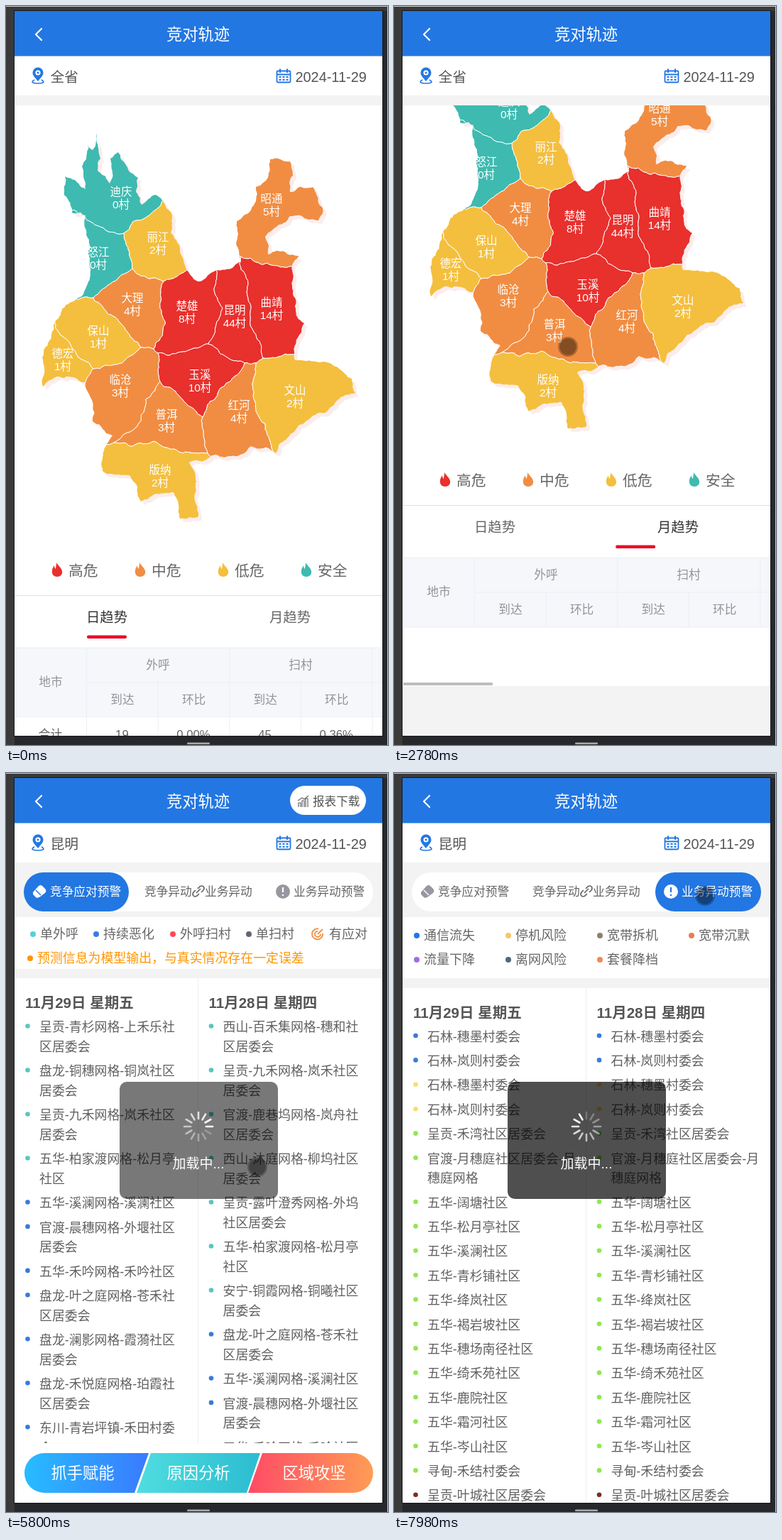
Recreate the animation shown at these times as an HTML page. Size 538 px wide and 1041 px high, loop 8000 ms.

```html
<!DOCTYPE html>
<html lang="zh-CN">
<head>
<meta charset="utf-8">
<style>
html,body{margin:0;width:100%;height:100%;overflow:hidden;background:#3a3a3a}
svg{display:block;width:100%;height:100%;font-family:'Liberation Sans','Noto Sans CJK SC','Noto Sans CJK',sans-serif}
</style>
</head>
<body>
<svg id="stage" viewBox="0 0 538 1041"></svg>
<script>
const BLUE = '#2377e2', RED = '#e8302d', ORANGE = '#f18d42', YELLOW = '#f4bf3e', TEAL = '#3fbab0';
const LOOP = 8000;

// ---------- drawing helpers ----------
const rect = (x, y, w, h, fill, extra = '') =>
  `<rect x="${x}" y="${y}" width="${w}" height="${h}" fill="${fill}" ${extra}/>`;
const dot = (x, y, r, fill) => `<circle cx="${x}" cy="${y}" r="${r}" fill="${fill}"/>`;
const path = (d, fill, extra = '') => `<path d="${d}" fill="${fill}" ${extra}/>`;
const line = (d, stroke, w = 1, extra = '') =>
  `<path d="${d}" fill="none" stroke="${stroke}" stroke-width="${w}" ${extra}/>`;
const text = (x, y, s, size, fill, anchor = 'start', weight = 400) =>
  `<text x="${x}" y="${(y + size * .37).toFixed(1)}" font-size="${size}" fill="${fill}" text-anchor="${anchor}" font-weight="${weight}">${s}</text>`;
const mid = (x, y, s, size, fill, weight) => text(x, y, s, size, fill, 'middle', weight);
const group = (id, body, extra = '') => `<g id="${id}" ${extra}>${body}</g>`;
const clip = (id, body) => `<clipPath id="${id}">${body}</clipPath>`;

// ---------- map: nearest-label cells cut out of one rough coastline ----------
const noise = (a, b) => {
  const v = Math.sin(a * 12.9898 + b * 78.233) * 43758.5453;
  return v - Math.floor(v) - .5;
};

// Splits an edge the same way from both ends, so neighbours share a border.
function rough(p, q) {
  const d = Math.hypot(q[0] - p[0], q[1] - p[1]);
  if (d < 5) return [q];
  const x = (p[0] + q[0]) / 2, y = (p[1] + q[1]) / 2;
  const m = [x + noise(x, y) * d * .26, y + noise(y, x) * d * .26];
  return [...rough(p, m), ...rough(m, q)];
}
const roughPath = pts => 'M' + pts.flatMap((p, i) => rough(p, pts[(i + 1) % pts.length]))
  .map(p => p.map(v => v.toFixed(1)).join()).join('L') + 'Z';

const coast = roughPath(`83,240 97,245 112,258 107,226 115,195 122,203 128,178 129,232 146,250 147,215 158,206
186,242 183,262 191,280 210,266 232,290 252,365 270,388 297,372 331,360 325,303 352,275 352,255 370,235 372,216
400,219 400,262 432,255 446,285 440,302 400,296 365,325 369,350 412,352 408,430 420,447 407,499 440,502 487,525
492,545 466,556 422,585 385,617 380,630 345,620 330,632 294,632 258,643 268,670 270,720 245,722 236,685 190,698
175,662 136,655 150,605 122,585 111,530 75,522 52,536 53,485 69,445 109,406 116,345 112,295 93,291`
  .split(/\s+/).map(p => p.split(',').map(Number)));

const regions = [
  ['怒江', 0, 130, 355, TEAL], ['迪庆', 0, 162, 270, TEAL], ['丽江', 2, 214, 334, YELLOW], ['大理', 4, 178, 420, ORANGE],
  ['保山', 1, 130, 466, YELLOW], ['德宏', 1, 80, 498, YELLOW], ['临沧', 3, 161, 535, ORANGE], ['普洱', 3, 226, 584, ORANGE],
  ['版纳', 2, 217, 662, YELLOW], ['楚雄', 8, 255, 431, RED], ['玉溪', 10, 273, 528, RED], ['昆明', 44, 322, 437, RED],
  ['曲靖', 14, 374, 426, RED], ['昭通', 5, 374, 280, ORANGE], ['红河', 4, 328, 571, ORANGE], ['文山', 2, 407, 550, YELLOW]
];

// Keeps the part of a polygon that lies closer to a than to b.
function cut(poly, a, b) {
  const side = p => (p[0] - (a[2] + b[2]) / 2) * (b[2] - a[2]) + (p[1] - (a[3] + b[3]) / 2) * (b[3] - a[3]);
  return poly.flatMap((p, i) => {
    const q = poly[(i + 1) % poly.length], u = side(p), v = side(q), k = u / (u - v);
    const out = u <= 0 ? [p] : [];
    if (u * v < 0) out.push([p[0] + (q[0] - p[0]) * k, p[1] + (q[1] - p[1]) * k]);
    return out;
  });
}
const frame = [[12, 140], [530, 140], [530, 760], [12, 760]];
const cells = regions.map(r => {
  const cell = regions.reduce((poly, other) => other === r ? poly : cut(poly, r, other), frame);
  return path(roughPath(cell.map(p => p.map(Math.round))), r[4]);
}).join('');
const labels = regions.map(([name, n, x, y]) =>
  mid(x, y - 9, name, 15.5, '#fff') + mid(x, y + 9.5, n + '村', 15.5, '#fff')).join('');
const map = path(coast, '#fbedec', 'transform="translate(5 5)"') +
  `<g clip-path="url(#coast)" stroke="#fff" stroke-linejoin="round">${cells}</g>` + labels;

// ---------- first page: map, trend tabs, table ----------
const FLAME = 'M-1-10C1-6 6-3 7 2C8 7 4 10 0 10C-5 10-8 6-7 1C-7-2-5-4-4-6C-4-3-3-2-2-1C-2-4-1-6-1-10Z';
const levels = [['高危', RED], ['中危', ORANGE], ['低危', YELLOW], ['安全', TEAL]].map(([s, c], i) =>
  path(FLAME, c, `transform="translate(${72 + i * 117} 794)"`) + text(88 + i * 117, 795, s, 20.8, '#666')).join('');

const COL = 100.6, ROW = 49.06, TOP = 1002, FULL = TOP + 17 * ROW, EMPTY = 1085;
const LINE = '#ebeef5', HEAD = '#909399';
const colX = i => 13 + i * COL;
const data = `合计 19 0 45 .36;版纳;德宏 0 0 1;昭通 2 1 1 1;昆明 6 -.33 24 1.18;大理 2 1 1 -.67;红河 3 0 1;曲靖 0 -1 9 .8;
保山 0 0 1;文山 1 0 0 -1;玉溪 4 .33 3 .5;楚雄 1 0 0 -1;普洱 0 0 0 -1;临沧 0 0 3 -.25;怒江;迪庆;丽江 0 0 1 1`.split(';');

const rows = data.map((row, r) => {
  const y = TOP + r * ROW, [name, ...vals] = row.trim().split(' ');
  let out = rect(13, y, 517, ROW, r % 2 ? '#fafafa' : '#fff') + line(`M13 ${y + ROW}H530`, LINE) +
    mid(62.5, y + 24, name, 16.7, '#606266');
  for (let c = 0; c < 4; c++) {
    const v = +vals[c] || 0;
    out += mid(colX(c + 1.5) - .5, y + 24, c % 2 ? v.toFixed(2) + '%' : v, 16.7, '#606266');
  }
  return out;
}).join('') + [1, 2, 3, 4, 5].map(c => line(`M${colX(c)} ${TOP}V${FULL}`, LINE)).join('');

const tableHead = rect(13, 904, 517, 98, '#f5f7fa') + line(`M13 904H530M${colX(1)} 953H530M13 1002H530`, LINE) +
  [1, 2, 3, 4, 5].map(c => line(`M${colX(c)} ${c % 2 ? 904 : 953}V1002`, LINE)).join('') +
  mid(63, 952, '地市', 16.7, HEAD) + mid(214, 928, '外呼', 16.7, HEAD) + mid(415, 928, '扫村', 16.7, HEAD) +
  ['到达', '环比', '到达', '环比'].map((s, i) => mid(164 + i * COL, 977, s, 16.7, HEAD)).join('');

const mapPage = group('mapPage', group('scroller',
  `<rect id="sheet" x="12" y="140" width="518" fill="#fff"/>` + map + levels + line('M12 830.5H530', '#e0e0e0') +
  group('dayTab', mid(142, 861, '日趋势', 19.3, 'inherit')) + group('monthTab', mid(400, 861, '月趋势', 19.3, 'inherit')) +
  `<rect id="underline" y="886.5" width="56" height="4.5" rx="2" fill="#ee0a24"/>` +
  tableHead + group('rows', rows) + `<rect id="hThumb" height="4" rx="1" fill="#bdbdbd"/>`), 'clip-path="url(#body)"');

// ---------- second page: warnings ----------
const GLOVE = 'M38 168L46 159Q49 157 51 159L56 164Q57 167 55 169L47 175L43 176L38 171Z';
const LINK = 'M268 169L274 163M270 163L273 160Q276 158 278 160T278 165L275 168M272 170L269 173Q266 175 264 173T264 168L267 165';
const tabs = [
  [25, 148, c => path(GLOVE, c[1]) + line('M42 165L49 172', c[2], 1.5) + text(62, 167, '竞争应对预警', 16.7, c[0])],
  [173, 195, c => text(195, 167, '竞争异动', 16.7, c[0]) + line(LINK, c[0], 1.7) + text(280, 167, '业务异动', 16.7, c[0])],
  [368, 149, c => dot(390, 167, 10, c[1]) + line('M390 161V168M390 171V173', c[2], 2.2) + text(405, 167, '业务异动预警', 16.7, c[0])]
].map(([x, w, icon], i) => group('off' + i, icon(['#666', '#9697a0', '#fff'])) +
  group('on' + i, rect(x, 140, w, 55, BLUE, 'rx="27.5"') + icon(['#fff', '#fff', BLUE]))).join('');

function list(x, y, title, items) {
  let out = text(x, y - 34, title, 20.5, '#555', 'start', 700);
  for (const [color, names] of items) for (const name of names.split(' ')) {
    out += dot(x + 3.5, y - 1, 3.3, color);
    for (const part of name.split('|')) { out += text(x + 20, y, part, 17.9, '#606060'); y += 27.6; }
    y += 6.8;
  }
  return out;
}
const legend = (y, xs, items) =>
  items.map(([s, c], i) => dot(xs[i], y + 1, 4, c) + text(xs[i] + 10, y, s, 18, '#666')).join('');

const AQUA = '#5bc5bf', AZURE = '#3a7bd8', LIME = '#8fe852';
const responseLists = list(27, 357.5, '11月29日 星期五', [
  [AQUA, '呈贡-青杉网格-上禾乐社|区居委会 盘龙-铜穗网格-铜岚社区|居委会 呈贡-九禾网格-岚禾社区|居委会 五华-柏家渡网格-松月亭|社区'],
  [AZURE, '五华-溪澜网格-溪澜社区 官渡-晨穗网格-外堰社区|居委会 五华-禾吟网格-禾吟社区 盘龙-叶之庭网格-苍禾社|区居委会 盘龙-澜影网格-霞漪社区|居委会 盘龙-禾悦庭网格-珀霞社|区居委会 东川-青岩坪镇-禾田村委|会']
]) + list(285.5, 357.5, '11月28日 星期四', [
  [AQUA, '西山-百禾集网格-穗和社|区居委会 呈贡-九禾网格-岚禾社区|居委会 官渡-鹿巷坞网格-岚舟社|区居委会 西山-沐庭网格-柳坞社区|居委会 呈贡-露叶澄秀网格-外坞|社区居委会 五华-柏家渡网格-松月亭|社区 安宁-铜霞网格-铜曦社区|居委会'],
  [AZURE, '盘龙-叶之庭网格-苍禾社|区居委会 五华-溪澜网格-溪澜社区 官渡-晨穗网格-外堰社区|居委会 五华-禾吟网格-禾吟社区']
]);

const grad = (id, a, b) => `<linearGradient id="${id}"><stop stop-color="${a}"/><stop offset="1" stop-color="${b}"/></linearGradient>`;
const responses = group('responses',
  rect(12, 203, 518, 825, '#fff') + rect(400, 18, 107, 41, '#fff', 'rx="20.5"') +
  line('M412 48V42H415V48M417 48V39H420V48M422 48V36H425V48M411 39L417 35L420 37L426 32', '#666', 1.2) +
  text(432, 40, '报表下载', 16.6, '#555') +
  legend(226, [38, 127, 235, 342], [['单外呼', '#5bcfd6'], ['持续恶化', '#3a7bea'], ['外呼扫村', '#ff4b55'], ['单扫村', '#636577']]) +
  line('M440 219.5A7.5 7.5 0 1 0 446 226M439 223A4 4 0 1 0 443 227M439 227L446 220', '#f2954e', 2) +
  text(455, 226, '有应对', 18, '#666') +
  dot(34, 261, 4, '#ff9500') + text(44, 260, '预测信息为模型输出，与真实情况存在一定误差', 17.9, '#ff9500') +
  rect(12, 276, 518, 13, '#f3f3f3') + line('M270.5 289V944', '#eee') +
  `<g clip-path="url(#listBox)">${responseLists}</g>` +
  path('M54 958H201L181 1014H54A28 28 0 0 1 54 958Z', 'url(#g1)') +
  path('M204 958H358L339 1014H184Z', 'url(#g2)') +
  path('M361 958H489A28 28 0 0 1 489 1014H341Z', 'url(#g3)') +
  ['抓手赋能', '原因分析', '区域攻坚'].map((s, i) => mid(108 + i * 163, 986, s, 22.3, '#fff')).join(''));

const villages = [
  [AZURE, '石林-穗墨村委会 石林-岚则村委会'],
  ['#fbdc68', '石林-穗墨村委会 石林-岚则村委会'],
  [LIME, '呈贡-禾湾社区居委会 官渡-月穗庭社区居委会-月|穗庭网格 五华-阔塘社区 五华-松月亭社区 五华-溪澜社区 五华-青杉铺社区 五华-绛岚社区 五华-褐岩坡社区 五华-穗场南径社区 五华-绮禾苑社区 五华-鹿院社区 五华-霜河社区 五华-岑山社区 寻甸-禾结村委会'],
  ['#7c2b22', '呈贡-叶城社区居委会']
];
const quad = [32, 161, 290, 419];
const changes = group('changes',
  rect(12, 203, 518, 825, '#fff') +
  legend(228, quad, [['通信流失', BLUE], ['停机风险', '#f7c66b'], ['宽带拆机', '#8f7f6d'], ['宽带沉默', '#ec7a52']]) +
  legend(262, quad, [['流量下降', '#a06fe0'], ['离网风险', '#4a6a85'], ['套餐降档', '#f28a4f']]) +
  rect(12, 289, 518, 14, '#f3f3f3') + line('M270.5 303V1028', '#eee') +
  list(27, 371, '11月29日 星期五', villages) + list(285.5, 371, '11月28日 星期四', villages), 'clip-path="url(#body)"');

const spokes = Array.from({ length: 12 }, (_, i) =>
  line('M0-11V-20', '#fff', 2.6, `stroke-linecap="round" opacity="${1 - i * .07}" transform="rotate(${-i * 30})"`)).join('');
const loader = group('loader', rect(160, 435, 223, 165, 'rgba(0,0,0,.69)', 'rx="10"') +
  group('spinner', spokes) + mid(271, 550, '加载中...', 19, '#fff'));

const warnPage = group('warnPage', rect(12, 203, 518, 759, '#fff') +
  rect(25, 140, 492, 55, '#fff', 'rx="27.5"') + tabs + responses + changes + loader);

// ---------- shared frame ----------
const header = rect(12, 7, 518, 63, BLUE) + rect(12, 70, 518, 1, '#7fb0ee') +
  line('M50 32L42 40L50 48', '#fff', 2.2, 'stroke-linecap="round" stroke-linejoin="round"') +
  mid(270.5, 40, '竞对轨迹', 22.3, '#fff', 500) +
  rect(12, 71, 518, 55, '#fff') + rect(12, 126, 518, 14, '#f3f3f3') +
  path('M45 106C41 101 37.5 98 37.5 94A7.5 7.5 0 0 1 52.5 94C52.5 98 49 101 45 106Z', BLUE) + dot(45, 94, 3.6, '#fff') + dot(45, 94, 1.5, BLUE) +
  line('M40 104C33 108 40 109 45 109S57 108 50 104', BLUE, 1.6) +
  group('province', text(62.5, 100, '全省', 19.8, '#555')) + group('city', text(62.5, 100, '昆明', 19.8, '#555')) +
  rect(381.5, 91.5, 19, 16, 'none', `rx="1.5" stroke="${BLUE}" stroke-width="1.8"`) +
  line('M386 88.5V94M396 88.5V94M382 96.5H400', BLUE, 2) +
  line('M384.5 100H398M384.5 104H398', BLUE, 2.2, 'stroke-dasharray="3 2"') +
  text(407.5, 100, '2024-11-29', 19.9, '#555');

document.getElementById('stage').innerHTML = '<defs>' +
  clip('body', rect(12, 140, 518, 888, '#000')) + clip('listBox', rect(12, 289, 518, 655, '#000')) + clip('coast', path(coast, '#000')) +
  grad('g1', '#27bcff', '#3a7aff') + grad('g2', '#50dde0', '#2bbcd0') + grad('g3', '#ff4b66', '#ff9c55') + '</defs>' +
  rect(0, 0, 538, 1041, '#3a3a3a') + rect(530, 7, 8, 1034, '#26292c') + rect(12, 1028, 526, 13, '#26282b') +
  rect(0, 0, 538, 1, '#ccc') + rect(537, 0, 1, 1041, '#ccc') + rect(255, 1037.5, 32, 2.5, '#aaa', 'rx="1"') +
  rect(11, 6, 520, 1023, '#17181a') + rect(12, 7, 518, 1021, '#f3f3f3') + mapPage + header + warnPage +
  `<rect id="vThumb" x="525" width="5" height="548" fill="#909090" opacity=".6"/>` +
  group('touch', dot(0, 0, 14, 'rgba(0,0,0,.26)') + dot(0, 0, 11.7, 'rgba(0,0,0,.26)'));

// ---------- motion ----------
const el = {};
document.querySelectorAll('[id]').forEach(n => el[n.id] = n);
const set = (id, attrs) => { for (const k in attrs) el[id].setAttribute(k, attrs[k]); };
const show = (id, on) => set(id, { display: on ? 'inline' : 'none' });
const clamp = v => Math.max(0, Math.min(1, v));
const within = (t, a, b) => t >= a && t < b;

// Eased position on a path of [time, ...values] stops.
function track(stops, t) {
  let i = 0;
  while (i < stops.length - 2 && t >= stops[i + 1][0]) i++;
  const [a, b] = [stops[i], stops[i + 1]];
  const k = clamp((t - a[0]) / (b[0] - a[0])), e = k * k * (3 - 2 * k);
  return a.slice(1).map((v, j) => v + (b[j + 1] - v) * e);
}

const touchPath = [[30, 510, 1041], [620, 224, 540], [810, 279, 505], [2150, 279, 505], [2560, 330, 531], [2780, 245, 480],
  [3400, 142, 734], [3800, 187, 512], [4400, 187, 512], [4590, 197, 511], [5120, 322, 437], [5800, 354, 555],
  [6160, 290, 198], [6350, 290, 198], [6450, 290, 170], [6910, 372, 170], [7150, 438, 173]];
const scrollPath = [[810, 0], [1140, 700], [1440, 700], [1590, 878], [1790, 878], [2400, 330], [2640, 330],
  [2900, 127], [3850, 127], [4150, 0]];

// Approximates the CSS "ease" curve.
const ease = k => 1 - Math.pow(1 - clamp(k), 2.6);

function drawMapPage(t) {
  const loaded = !within(t, 2640, 2990) && !within(t, 3460, 3650);
  const month = within(t, 2640, 3460);
  const bottom = loaded ? FULL : EMPTY;
  const scroll = Math.min(track(scrollPath, t)[0], bottom - 958);
  set('scroller', { transform: `translate(0 ${-scroll})` });
  set('sheet', { height: bottom - 140 });
  show('rows', loaded);
  set('hThumb', { x: loaded ? 114 : 13, y: bottom - 5, width: loaded ? 193 : 126 });
  set('underline', { x: 114 + 258 * (ease((t - 2652) / 300) - ease((t - 3460) / 300)) });
  set('dayTab', { fill: month ? '#666' : '#333' });
  set('monthTab', { fill: month ? '#333' : '#666' });
  set('vThumb', { y: 7 + scroll / 878 * 472 });
}

function drawWarnPage(t) {
  const active = t < 6400 ? 0 : t < 7220 ? 1 : 2;
  for (let i = 0; i < 3; i++) {
    show('on' + i, i === active);
    show('off' + i, i !== active);
  }
  show('responses', within(t, 5650, 6400));
  show('changes', t >= 7750);
  const opacity = active ? clamp((t - 6420) / 200) : Math.min(clamp((t - 5120) / 200), clamp((6030 - t) / 300));
  set('loader', { opacity });
  set('spinner', { transform: `translate(271 498) rotate(${Math.floor(t / 800 * 12) * 30 % 360})` });
}

function draw(t) {
  const second = t >= 5120;
  for (const id of ['mapPage', 'province']) show(id, !second);
  for (const id of ['warnPage', 'city']) show(id, second);
  (second ? drawWarnPage : drawMapPage)(t);
  show('vThumb', within(t, 850, 2640) || within(t, 3850, 5120));
  show('touch', t >= 30);
  set('touch', { transform: `translate(${track(touchPath, t)})` });
}

function tick() {
  draw(performance.now() % LOOP);
  requestAnimationFrame(tick);
}
tick();
</script>
</body>
</html>
```
